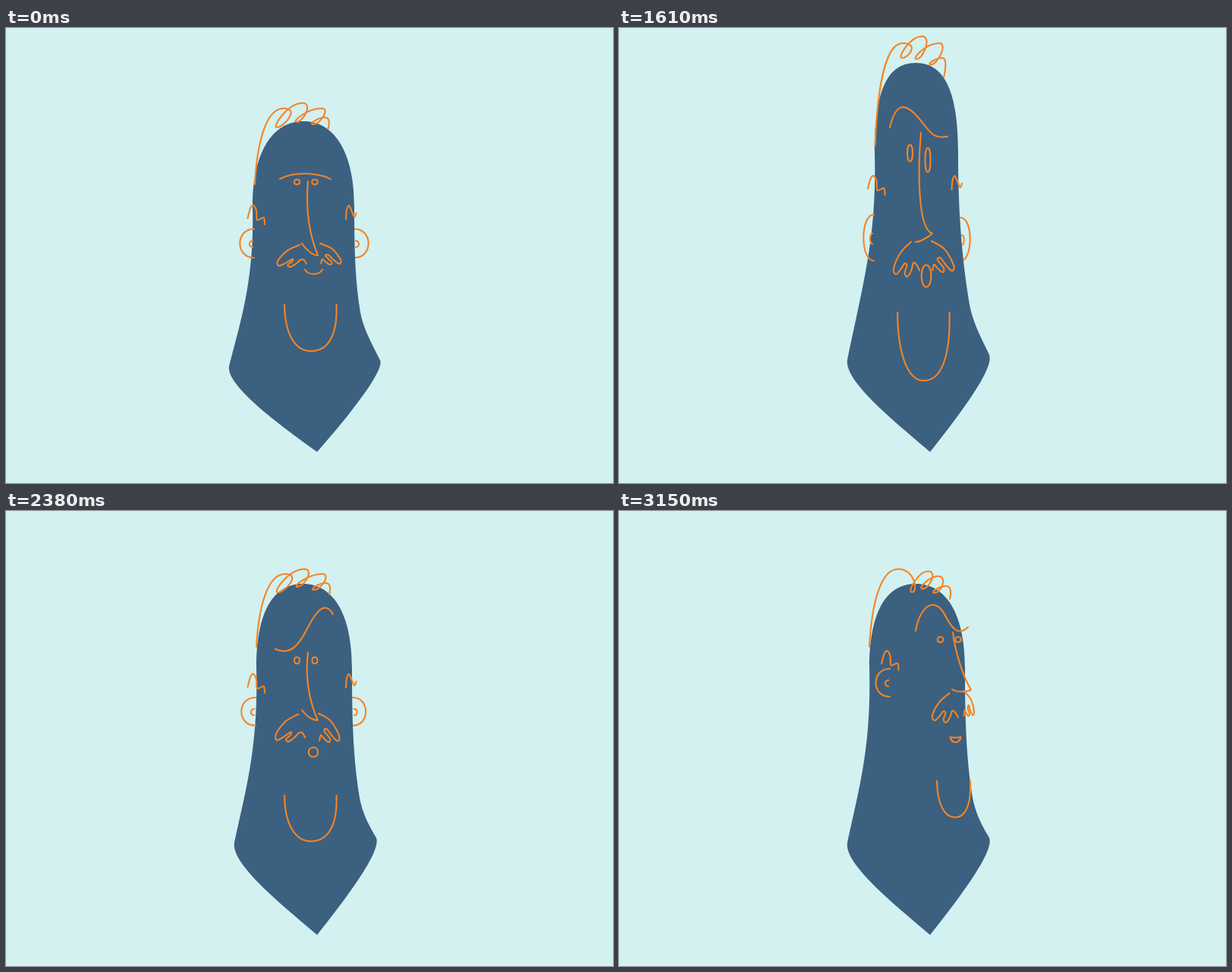
An HTML page that plays this animation: 800x600 px, repeating every 4970 ms.

```html
<!DOCTYPE html>
<html lang="en">
<head>
<meta charset="utf-8">
<title>Bearded head</title>
<style>
html, body { margin: 0; width: 100%; height: 100%; overflow: hidden; background: #d2f1f0; }
svg { display: block; width: 100vw; height: 100vh; }
path { fill: none; stroke: #f58426; stroke-width: 2.1; stroke-linecap: round; stroke-linejoin: round; }
path.solid { fill: #3c6080; stroke: none; }
</style>
</head>
<body>
<svg id="stage" viewBox="0 0 800 600"></svg>
<script>
const LOOP = 4970, STEP = 70;

const mix = (a, b, k) => a.map((v, i) => v + (b[i] - v) * k);
const numbers = text => text.trim().split(/\s+/).map(Number);

// Chain of cubic segments: start, then two handles and an end for each.
function cubics(...n) {
  const d = n.map(v => v.toFixed(2));
  return `M${d[0]} ${d[1]}C${d.slice(2).join(' ')}`;
}

// Smooth curve through every point of a flat list.
function spline(n) {
  const last = n.length / 2 - 1;
  const at = i => { const k = 2 * Math.max(0, Math.min(last, i)); return [n[k], n[k + 1]]; };
  const out = at(0);
  for (let i = 0; i < last; i++) {
    const [a, b, c, e] = [at(i - 1), at(i), at(i + 1), at(i + 2)];
    out.push(b[0] + (c[0] - a[0]) / 6, b[1] + (c[1] - a[1]) / 6,
             c[0] - (e[0] - b[0]) / 6, c[1] - (e[1] - b[1]) / 6, ...c);
  }
  return cubics(...out);
}

// Upper and lower arc; collapses to one curved line when up = -down.
function lens([x, y, rx, up, down]) {
  const open = Math.max(0, Math.min(1, (up + down) / (2 * down)));
  const h = rx * (0.55 + 0.45 * open), top = y - up * 4 / 3, low = y + down * 4 / 3;
  return cubics(x - rx, y, x - h, top, x + h, top, x + rx, y, x + h, low, x - h, low, x - rx, y);
}

// Outer arc with a small copy inside; side is -1 left, 1 right.
const ear = side => ([x, y, w, h]) => {
  const arc = (x, y, w, h) => {
    const bulge = x + side * w * 4 / 3;
    return cubics(x, y, bulge, y, bulge, y + h, x, y + h);
  };
  return arc(x, y, w, h) + arc(x + side * 2, y + h * 0.41, w * 0.22, h * 0.22);
};

// Fixed squiggle moved by dx, dy and narrowed towards its right end.
const sideburn = shape => ([dx, dy, width]) => width < 0.25 ? '' :
  spline(shape.map((v, i) => i % 2 ? v + dy : 461 + (v - 461) * width + dx));

// Squiggle in a box, blended between its slanted and its open form (in % of the box).
const moustache = (slanted, open) => ([x, y, w, h, blend]) =>
  spline(mix(slanted, open, blend).map((v, i) => i % 2 ? y + v * h / 100 : x + v * w / 100));

function head([tx, ty, lx, rx, sideY, bendY, bendX, waistX, waistY, narrow]) {
  const shoulder = sideY - 0.63 * (sideY - ty), upper = waistY - sideY;
  const left = [294.5 + 6.5 * narrow, 444 - 7 * narrow];
  const right = [493 - 5 * narrow, 438 - 7 * narrow];
  const lower = right[1] - waistY;
  return cubics(tx, ty,
    tx - 41, ty, lx, shoulder, lx, sideY,
    lx + 2.5, bendY, bendX, bendY + 54, ...left,
    287 + 9 * narrow, 466 - 3 * narrow, 345 + 8 * narrow, 513 - 2 * narrow, 410, 559,
    447, 517 - 5 * narrow, 500 - 5 * narrow, 452 - 2 * narrow, ...right,
    right[0] - 12.5, right[1] - 0.4 * lower, waistX + 0.07 * lower, waistY + 0.36 * lower, waistX, waistY,
    waistX - 0.05 * upper, waistY - 0.3 * upper, rx, sideY + 0.4 * upper, rx, sideY,
    rx, shoulder, tx + 41, ty, tx, ty);
}

// A long sweep, then loops running crest, dip, crest, dip; flat tangents at each turn.
function hair(n) {
  const [x, y, crestX, crestY] = n;
  const out = [x, y, x + 3, y - 0.56 * (y - crestY), crestX - 23, crestY, crestX, crestY];
  const [endX, endY] = n.slice(14);
  const reach = [22, 14, 12];
  for (let i = 0; i < 3; i++) {
    const [cx, cy, dipX, dipY, nextX, nextY] = n.slice(2 + 4 * i, 8 + 4 * i);
    const [toX, toY] = i < 2 ? [nextX, nextY] : [dipX + 15, dipY - 9];
    out.push(cx + reach[i], cy, dipX + 9, dipY, dipX, dipY,
             dipX - 7, dipY, toX - 0.58 * (toX - dipX), toY, toX, toY);
    if (i === 2) out.push(toX + 7, toY, endX + 2, endY - 8, endX, endY);
  }
  return cubics(...out);
}

// Two curves with one tangent through the middle.
const brow = ([x, y, ax, ay, bx, by, mx, my, cx, cy, ex, ey]) =>
  cubics(x, y, ax, ay, bx, by, mx, my, mx + 0.8 * (mx - bx), my + 0.8 * (my - by), cx, cy, ex, ey);

function nose([x, y, tipX, tipY, baseX, baseY, lean, pullX, pullY]) {
  const rise = tipY - baseY;
  return cubics(x, y, x + lean, y + 0.34 * (tipY - y), tipX + pullX, tipY + pullY, tipX, tipY,
    tipX - 6, tipY + 3 - 0.2 * rise, baseX + 6, baseY + 4 + 0.35 * rise, baseX, baseY);
}

function chin([l, r, top, x, low]) {
  const y = top + 0.63 * (low - top);
  return cubics(l, top, l + 0.5, y, x - 0.6 * (x - l), low, x, low,
    x + 0.7 * (r - x), low, r + 1.5, y, r, top);
}

// Each part gets one line per pose:
// rest, crouch, stretch, landed, settled, turned, final.
const parts = [];
function part(draw, rows, style = '') {
  const path = document.createElementNS('http://www.w3.org/2000/svg', 'path');
  path.setAttribute('class', style);
  document.getElementById('stage').append(path);
  parts.push({ draw, path, poses: rows.trim().split('\n').map(numbers) });
}

// The right ear slides behind the head as it turns.
part(ear(1), `
459 265 18.7 38
470 278 18.7 38
450 250 12.7 57
456.5 246 17.3 39
457 246 17.2 37
425 214 17 37
425 208 17 37`);

part(head, `
392 123 325 459 235 330 310 467 375 0
390 133 323.5 458 238 300 287 471 335 0
391 46 337 447 165 270 325 462 365 1
391 93 330 456 205 310 317 466 378 1
391 96 330 456 207 310 317 466 378 1
390 99 330 456 207 310 317 470 378 1
391 96 330 456 207 310 317 466 378 1`, 'solid');

part(ear(-1), `
327 265 18.7 38
317 278 18.7 38
336 246 13.7 61
329 246 18 39
329 246 18.8 37
356 214 18.8 37
357 208 18.5 37`);

part(sideburn(numbers('318.5 251 322 238 326 234 330 241 331 253 339.5 250 341 259')), `
0 0 1
-6 32 1
9.5 -39 1
0.5 -20.5 1
0 -19 1
27.5 -43.5 1
27.5 -49.5 1`);
part(sideburn(numbers('448 252 449 240 452 234 455 240 459 249 461.5 244')), `
0 0 1
5 31.5 1
-9.5 -39 1
-0.5 -20 1
0 -19 1
0 -43 0
0 -49 0`);

part(hair, `
328 206 366 106 357 131 391 99 383 124 416 106 405 127 424.5 133
322 221 363 130 352 153 391 125 381 147 417 130 404 150 427 156
337.5 155 374 20 373 39.5 399 11 392 41 422 20 411 48.5 428 65
330 179 368 80 358 105 389 81 384 97.5 414 82 406 102 426 107
330 179 368 83 358 107.5 393 76.5 384 100 417 83 406 104 426 110
330.5 180 368 79 384 108 405 80 399 103 420 87 415 109 435 116
330 179 368 76.5 386 107 407 79.5 400 102.5 421 86 416 108 436 116`);

part(brow, `
361 199 372 193 383 192 394 192 420 194 428 199.5
361 214 372 214 383 215 394 215.5 417 216 428 216
357 131 365 97 378 98 396 120 414 147 433 143
355 172 371 184 383 175 396 155 420 119 431 135
355 182 372 190 384 181 396 157 419 115 431 136
390 166 397 135 416 126 428 145 446 164 460 156
391 158 396 127 416 110 430 138 450 163 460 153`);

// eyes
part(lens, `
383.5 203 3.7 3.3 3.3
383.5 227 6 0.3 4
383.5 165 3.5 11 11
383.5 187 3.7 3.2 3.2
383.5 197 3.5 4.3 4.3
424 179 8 -3 3
423.5 169.5 3.7 3.5 3.5`);
part(lens, `
407 203 3.7 3.3 3.3
407.5 227 6 0.3 4
407 174 3.5 16 16
407 186 3.7 3.2 3.2
407 197 3.5 4.3 4.3
447.5 178.5 8 -3 3
447 169.5 3.7 3.5 3.5`);

part(nose, `
398 202 411 300 390 284 -3 -13 -32
398 207 415 312 390 293 -3 -19 -27
398 138 413 271 391 282 -4 -20 -6
398 184 412 274 390 263 -4 -13 -24
398 187 411 276 390 262.5 -4 -12 -26
438 166 460 243 436 241 3 -10 -18
440 160 464 236 439 235 3 -11 -19`);

part(moustache(
  numbers('77 0 34 26 1 72 4 95 24 85 52 65 49 78 35 91 44 100 66 83 81 67 92 69 100 85'),
  numbers('67 0 27 31 0 76 9 93 28 78 43 62 51 68 43 89 52 100 68 83 76 61 87 64 100 82')), `
358 286 38 29 0
358 295.5 38 24.5 0
362 282 34 46 1
359 268 36 36 0
355.5 268 38.5 36 0
408 247 34 38 1
413 240 34 39 1`);
part(moustache(
  numbers('0 0 59 26 100 77 93 96 66 78 40 54 27 60 56 88 48 100 24 85 11 75 4 94'),
  numbers('0 0 67 33 100 82 86 97 62 77 51 58 40 70 57 94 42 100 22 84 10 78 5 100')), `
414 284 27 28 0
414 296 26 22 0
412 281 29 41 0
414 267 28 35 0
412 267 27 38 0
453 248 13.5 31 1
454 237 14 33 1`);

// mouth
part(lens, `
405.5 318.5 11.7 -6 6
404 325.5 20 -6 6
405 327 6.3 14.5 14.5
405 316.5 6.2 7 7
405 318 6.2 6.2 6.2
440.5 303 7 -1 7
443.5 298 7 -0.7 7`);

part(chin, `
367 435.5 365 402 426
358.5 443.5 365 401 426
367 435.5 375 402 465
367 435.5 375 402 437
367 435.5 375 402 435.5
416 463 361 440.5 411
419 463 356 443 404`);

// Two extremes continue the motion past the drawn poses.
const SQUASH = 7, PEAK = 8;
for (const { poses } of parts)
  poses.push(mix(poses[0], poses[1], 2.8), mix(poses[3], poses[2], 1.05));

const linear = u => u;
const easeOut = u => 1 - (1 - u) ** 2;
const easeInOut = u => u * u * (3 - 2 * u);

// [time, pose, easing on the way there]
const keys = [
  [0, 0, linear], [1120, 0, linear], [1190, 1, linear], [1330, SQUASH, easeOut],
  [1610, 2, easeInOut], [1750, PEAK, easeOut], [1960, 3, easeInOut], [2380, 4, easeOut],
  [2870, 5, easeInOut], [3150, 6, easeOut], [LOOP, 6, linear]
];

let shown = -1;
function render(now) {
  const t = Math.floor(now % LOOP / STEP) * STEP;
  if (t === shown) return;
  shown = t;
  const i = keys.findIndex(key => key[0] > t);
  const [t0, from] = keys[i - 1], [t1, to, ease] = keys[i];
  const k = ease((t - t0) / (t1 - t0));
  for (const { draw, path, poses } of parts)
    path.setAttribute('d', draw(mix(poses[from], poses[to], k)));
}

const start = performance.now();
function tick() {
  render(performance.now() - start);
  requestAnimationFrame(tick);
}
tick();
</script>
</body>
</html>
```
